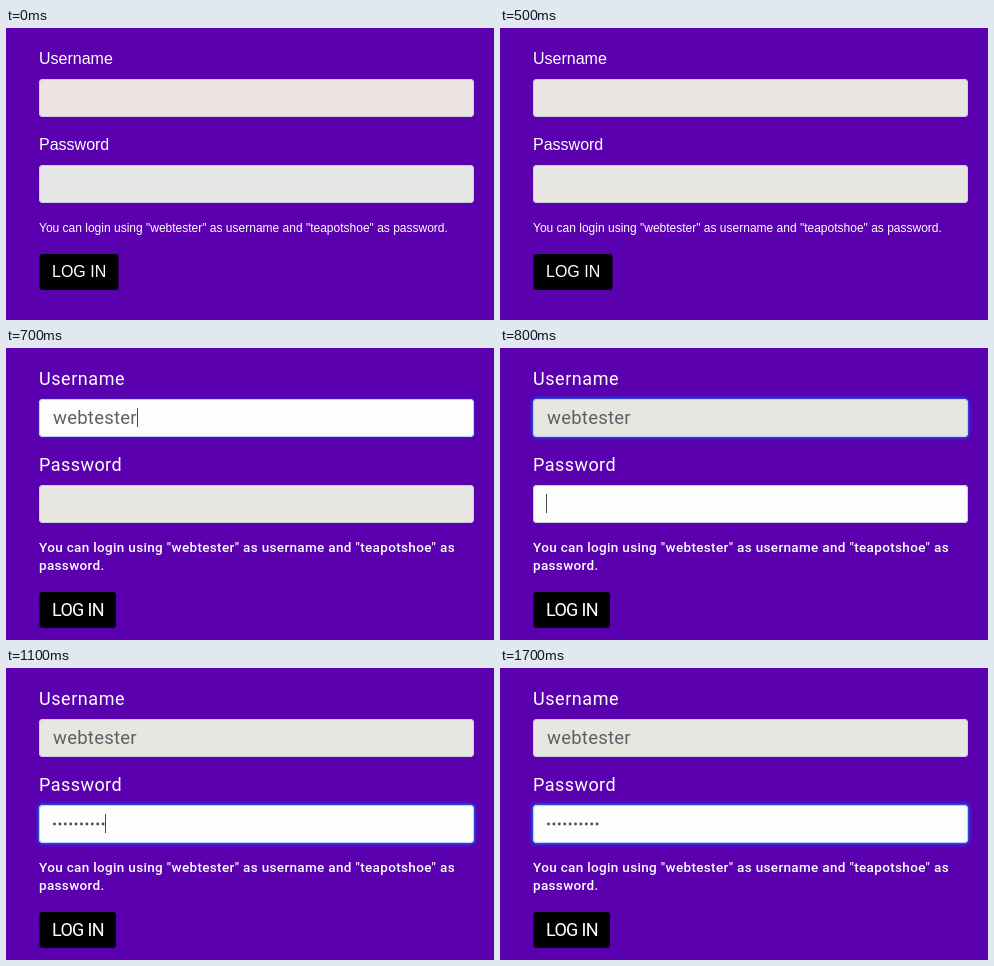
These frames come from a looping animation (488x292 px, 1.8 s). An HTML page with a canvas:

```html
<!DOCTYPE html>
<html lang="en">
<head>
<meta charset="utf-8">
<title>Login form</title>
<style>
  html, body { margin: 0; width: 100%; height: 100%; overflow: hidden; background: #5a00ae; }
  canvas { display: block; }
</style>
</head>
<body>
<canvas id="stage" width="488" height="292"></canvas>
<script>
const ctx = document.getElementById('stage').getContext('2d');
const LOOP = 1800, STEP = 100;
const USER = 'webtester', PASS = 'teapotshoe';
const HINT = `You can login using "${USER}" as username and "${PASS}" as`;
const GREY = '#e8e6e0', WHITE = '#fdfdfe', INK = '#5c6066';

const FALLBACK = '"Liberation Sans", Arial, sans-serif';
const WEB = 'Roboto, sans-serif';

function text(str, x, y, font, color = '#fff', spacing = 0) {
  ctx.font = font;
  ctx.letterSpacing = spacing + 'px';
  ctx.fillStyle = color;
  ctx.fillText(str, x, y);
  return x + ctx.measureText(str).width;
}

function box(x, y, w, h, r) {
  ctx.beginPath();
  ctx.roundRect(x, y, w, h, r);
}

function field(y, fill, glow) {
  if (glow > 0) {
    ctx.save();
    ctx.globalAlpha = glow;
    ctx.shadowColor = '#2b4cff';
    ctx.shadowBlur = 4;
    ctx.fillStyle = '#2f48dc';
    box(32, y - 1, 437, 40, 5);
    ctx.fill();
    ctx.restore();
  }
  ctx.fillStyle = fill;
  box(33, y, 435, 38, 4);
  ctx.fill();
  ctx.strokeStyle = glow > 0 ? '#b4d2f6' : '#cfcfda';
  ctx.lineWidth = 1;
  box(33.5, y + 0.5, 434, 37, 3.5);
  ctx.stroke();
}

function caret(x, y) {
  ctx.fillStyle = '#45454a';
  ctx.fillRect(Math.round(x), y, 1, 19);
}

function dots(y) {
  ctx.fillStyle = '#4a4a50';
  for (let i = 0; i < PASS.length; i++) {
    ctx.beginPath();
    ctx.arc(48.5 + i * 5.4, y, 1.4, 0, Math.PI * 2);
    ctx.fill();
  }
}

function button(y, w) {
  ctx.fillStyle = '#000';
  box(33.5, y, w, 36, 3);
  ctx.fill();
}

function drawFallback(step) {
  field(51, step === 0 ? '#ece3e3' : '#e8e5e1', 0);
  field(137, step === 0 ? '#e6e6e6' : '#e7e6e1', 0);
  text('Username', 33, 36, `16px ${FALLBACK}`);
  text('Password', 33, 122, `16px ${FALLBACK}`);
  text(HINT + ' password.', 33, 204, `12px ${FALLBACK}`);
  button(226, 79);
  text('LOG IN', 46, 249, `16px ${FALLBACK}`);
}

function drawStyled(step) {
  const userActive = step < 8;
  const userGlow = { 7: 0.15, 8: 0.8, 9: 0.6, 10: 0.45 }[step] || 0;
  const passGlow = step < 9 ? 0 : Math.min(1, (step - 8) * 0.3);
  const label = `18px ${WEB}`;
  const small = `500 13.5px ${WEB}`;

  field(51, userActive ? WHITE : GREY, userGlow);
  field(137, userActive ? GREY : WHITE, passGlow);

  text('Username', 33, 37, label, '#fff', 0.55);
  text('Password', 33, 123, label, '#fff', 0.45);
  text(HINT, 33, 204, small, '#fff', 0.33);
  text('password.', 33, 222, small, '#fff', 0.33);
  button(244, 76.5);
  text('LOG IN', 46, 268, label, '#fff', -0.7);

  let end = 46;
  if (step >= 7) end = text(USER, 47, 76, `18.5px ${WEB}`, INK, 0.25);
  if (userActive) caret(end, 60);
  if (step >= 9) dots(156);
  if (step >= 8 && step < 12) caret(step === 8 ? 46 : 99, 146);
}

function frame() {
  const step = Math.floor(performance.now() % LOOP / STEP);
  ctx.fillStyle = '#5a00ae';
  ctx.fillRect(0, 0, 488, 292);
  if (step < 6) drawFallback(step);
  else drawStyled(step);
  requestAnimationFrame(frame);
}
frame();
</script>
</body>
</html>
```
